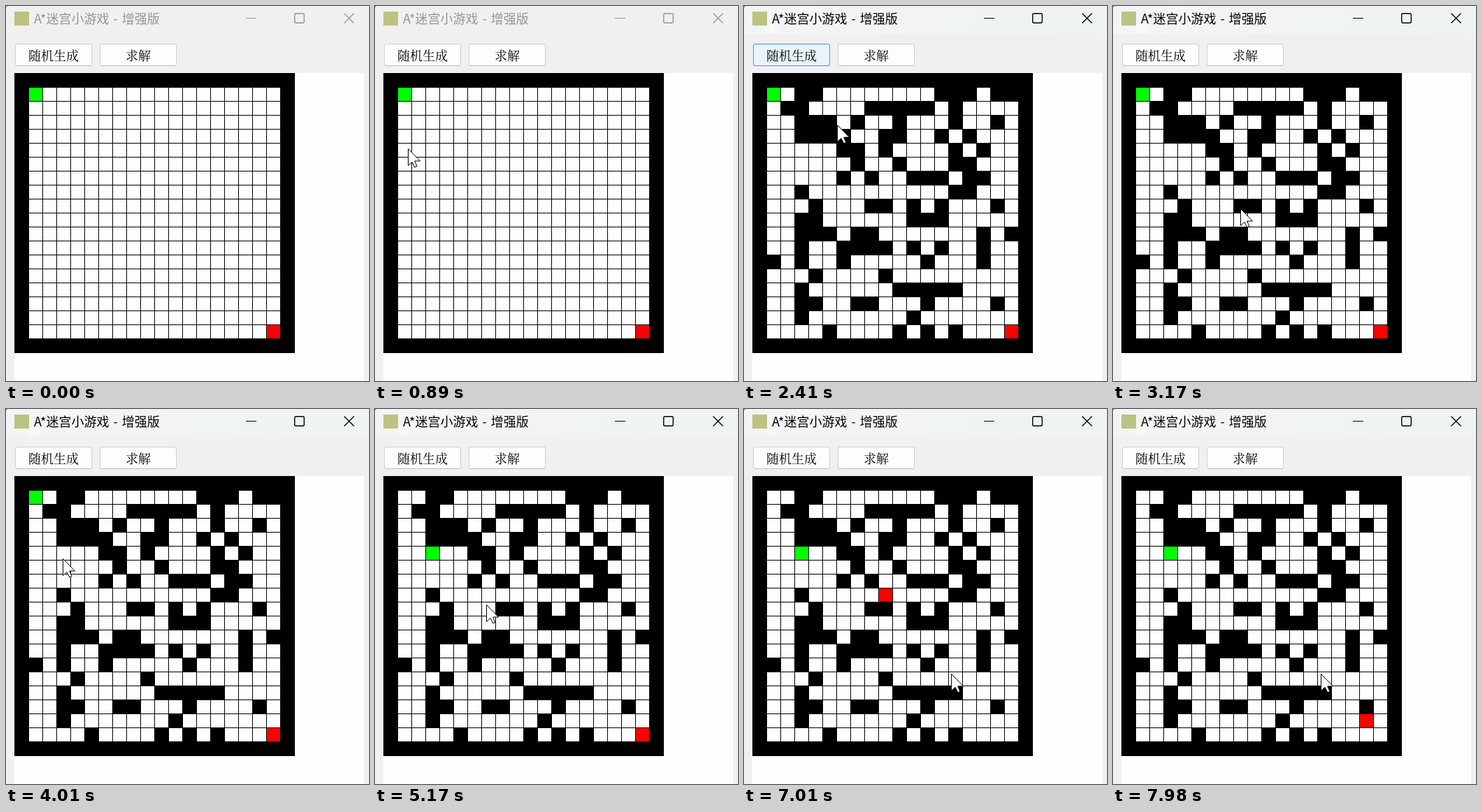
These frames come from a looping animation (519x537 px, 8 s). An HTML page with a canvas:

```html
<!DOCTYPE html>
<html lang="zh-CN">
<head>
<meta charset="utf-8">
<title>A*迷宫小游戏 - 增强版</title>
<style>
html, body { margin: 0; width: 100%; height: 100%; overflow: hidden; background: #f0f0f0; }
#stage { position: absolute; left: 0; top: 0; width: 519px; height: 537px; overflow: hidden; background: #f0f0f0; }
#stage > * { position: absolute; box-sizing: border-box; }
#bar { left: 0; top: 0; width: 519px; height: 40px; }
#bar.active {
  background:
    radial-gradient(14px 10px at 40px 33px, #fff9, transparent),
    radial-gradient(30px 7px at 90px 4px, #fff8, transparent),
    linear-gradient(90deg, #f3f5f4, #eff3f3);
}
#icon { left: 12px; top: 8px; width: 21px; height: 20px; background: #bcc382; }
#title {
  left: 40px; top: 4px; white-space: pre; word-spacing: 2px; color: #949494;
  font: 18px/26px "Noto Sans CJK SC", "Noto Sans CJK", sans-serif;
}
#bar.active ~ #title { color: #000; }
.button {
  top: 54px; width: 110px; height: 32px; border: 1px solid #d0d0d0; border-bottom-color: #c0c0c0;
  border-radius: 3px; background: #fdfdfd; color: #000; text-align: center;
  font: 300 18px/30px "Noto Serif CJK SC", "Noto Sans CJK SC", "Noto Sans CJK", serif;
}
#generate::before {
  content: ""; position: absolute; inset: -1px; z-index: -1; border: 1px solid #0078d4;
  border-radius: 3px; background: #e0eef9; opacity: var(--hover, 0);
}
#generate { isolation: isolate; }
#panel { left: 12px; top: 96px; width: 500px; height: 441px; background: #fefefe; }
canvas { left: 0; top: 0; }
</style>
</head>
<body>
<div id="stage">
  <div id="bar"></div>
  <div id="icon"></div>
  <div id="title">A*迷宫小游戏 - 增强版</div>
  <div class="button" id="generate" style="left:13px">随机生成</div>
  <div class="button" style="left:134px">求解</div>
  <div id="panel"></div>
  <canvas id="view" width="519" height="537"></canvas>
</div>
<script>
const LOOP = 8000, STEP = 40, SIZE = 20, INNER = 18;
const ACTIVE_AT = 1770, MAZE_AT = 2050, START_AT = 4090, GOAL_AT = 5970, GOAL_END = 7610;

const bar = document.getElementById('bar');
const generate = document.getElementById('generate');
const ctx = document.getElementById('view').getContext('2d');

// The generated level, # is a wall.
const level = `
..##........###.##
.##....#####.#....
..###.#..#...#..#.
..####..##..#.#...
.....##.#....#.#..
......#..#...##...
.....#.#..###.##..
..#..........##...
...#...##.#.#...#.
..##......###.....
..###.##.......#.#
..#..####.#.#..#..
#.#..#.....#...#..
...#....#.........
..#......#####....
..##..##...#....#.
..#.......#.......
....#....#.#.#....`.trim().split('\n');

// Turning points of the pointer: time, x, y.
const route = [
  [330, -10, 365], [1130, 71, 135], [1570, 83, 82], [2090, 82, 72],
  [2410, 133, 170], [3010, 207, 315], [3650, 105, 214],
  [4010, 81, 214], [4250, 81, 214], [4770, 187, 268],
  [5170, 159, 280], [5370, 146, 290], [5930, 210, 263],
  [6410, 219, 266], [7210, 322, 416], [7410, 354, 449],
  [7850, 354, 449], [7970, 297, 379]
];
const arrow = new Path2D('M.5.5v24l5.5-5 3.8 7.5 3.2-1.5-3.3-7.5h7.8z');

const ramp = (t, from, to) => Math.min(1, Math.max(0, (t - from) / (to - from)));

function pointerAt(t) {
  const i = route.findIndex(key => key[0] > t);
  if (i < 0) return route[route.length - 1].slice(1);
  const [t0, x0, y0] = route[i - 1], [t1, x1, y1] = route[i];
  const p = ramp(t, t0, t1);
  return [x0 + (x1 - x0) * p, y0 + (y1 - y0) * p].map(Math.round);
}

function cell(col, row, color) {
  ctx.fillStyle = color;
  ctx.fillRect(13 + SIZE * col, 97 + SIZE * row, SIZE - 1, SIZE - 1);
}

function drawBoard(t) {
  ctx.fillStyle = '#000';
  ctx.fillRect(12, 96, 401, 401);
  for (let row = 0; row < INNER; row++) {
    for (let col = 0; col < INNER; col++) {
      if (t < MAZE_AT || level[row][col] === '.') cell(col + 1, row + 1, '#fefefe');
    }
  }
  const start = t < START_AT ? [1, 1] : [3, 5];
  const goal = t < GOAL_AT ? [INNER, INNER] : t < GOAL_END ? [9, 8] : [17, 17];
  cell(...start, '#0f0');
  cell(...goal, '#f00');
}

function drawControls(active) {
  const color = active ? '#000' : '#949494';
  ctx.fillStyle = ctx.strokeStyle = color;
  ctx.fillRect(343, 17, 15, 1);
  ctx.lineWidth = 1.4;
  ctx.beginPath();
  ctx.roundRect(412.7, 10.7, 13.6, 13.6, 2);
  ctx.moveTo(483.5, 10.5);
  ctx.lineTo(497.5, 24.5);
  ctx.moveTo(497.5, 10.5);
  ctx.lineTo(483.5, 24.5);
  ctx.stroke();
  // Rounded window corner
  ctx.fillStyle = '#555';
  ctx.beginPath();
  ctx.moveTo(0, 0);
  ctx.lineTo(3, 0);
  ctx.quadraticCurveTo(0, 0, 0, 3);
  ctx.fill();
}

function drawPointer(t) {
  if (t < route[0][0]) return;
  ctx.save();
  ctx.translate(...pointerAt(t));
  ctx.fillStyle = '#fff';
  ctx.strokeStyle = '#000';
  ctx.lineWidth = 1;
  ctx.fill(arrow);
  ctx.stroke(arrow);
  ctx.restore();
}

function draw(now) {
  const t = Math.floor((now % LOOP - 8) / STEP) * STEP + 10;
  const active = t >= ACTIVE_AT;
  const hover = Math.min(ramp(t, 1450, 1710), 1 - ramp(t, 2210, 2770));
  bar.classList.toggle('active', active);
  generate.style.setProperty('--hover', hover);
  ctx.clearRect(0, 0, 519, 537);
  drawControls(active);
  drawBoard(t);
  drawPointer(t);
}

const begin = performance.now();
function tick() {
  draw(performance.now() - begin);
  requestAnimationFrame(tick);
}
tick();
</script>
</body>
</html>
```
